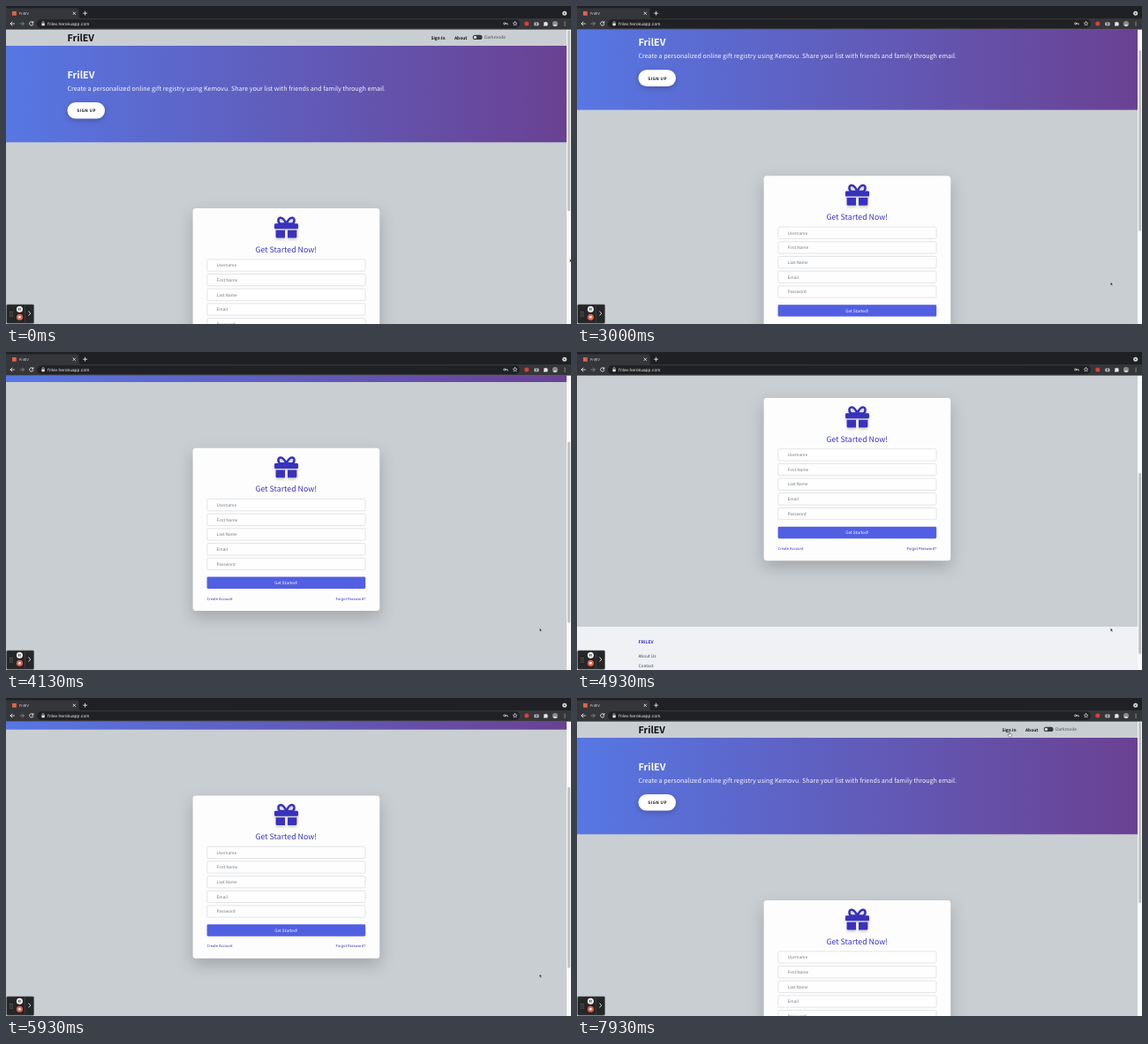
Animation, 640 px wide and 360 px high, one loop 8 s. Source, as an HTML page:

```html
<!DOCTYPE html>
<html lang="en">
<head>
<meta charset="utf-8">
<title>FrilEV</title>
<style>
  html, body { margin: 0; width: 100%; height: 100%; overflow: hidden; background: #c9ced2; }
  svg { display: block; width: 100%; height: 100%; }
  text {
    font-family: "Noto Sans CJK JP", "Noto Sans CJK SC", "Noto Sans CJK", "Noto Sans", sans-serif;
    text-rendering: geometricPrecision;
    white-space: pre;
  }
  .ui text { font-family: Inter, Roboto, sans-serif; }
  .line { fill: none; stroke: #e4e5e7; stroke-width: .9; stroke-linecap: round; stroke-linejoin: round; }
  .card { filter: drop-shadow(0 7px 9px rgba(0, 0, 0, .2)); }
  .pill { filter: drop-shadow(0 2px 3px rgba(0, 0, 0, .22)); }
  .gift { filter: drop-shadow(0 2px 1.5px rgba(0, 0, 0, .2)); }
</style>
</head>
<body>
<svg viewBox="0 0 640 360" xmlns="http://www.w3.org/2000/svg">
  <defs>
    <linearGradient id="hero">
      <stop offset="0" stop-color="#5777e3"/>
      <stop offset="1" stop-color="#6a4192"/>
    </linearGradient>
    <clipPath id="view"><rect y="26.5" width="635" height="333.5"/></clipPath>
  </defs>

  <rect width="640" height="360" fill="#c9ced2"/>
  <g clip-path="url(#view)">
    <g id="page">
      <rect y="45" width="635" height="109.3" fill="url(#hero)"/>
      <rect class="pill" x="69.5" y="109" width="42.5" height="18.6" rx="9.3" fill="#fff"/>
      <rect x="528.7" y="32.8" width="10.8" height="5.2" rx="2.6" fill="#343a40"/>
      <circle cx="531.4" cy="35.4" r="1.7" fill="#d5d9dc"/>

      <rect class="card" x="211.6" y="229" width="211.6" height="184.3" rx="3.5" fill="#fdfdfd"/>
      <g class="gift" fill="#3832bd">
        <rect x="304" y="246.2" width="27" height="6" rx="1.3"/>
        <path d="M305.6 253.7H316V262.5H307.1Q305.6 262.5 305.6 261ZM319 253.7H329.4V261Q329.4 262.5 327.9 262.5H319Z"/>
        <path fill="none" stroke="#3832bd" stroke-width="2.5" d="M317.5 246.6C315.4 241.6 312.6 239.4 310.6 239.7C307.6 240.2 307.8 245.4 311 246.6ZM317.5 246.6C319.6 241.6 322.4 239.4 324.4 239.7C327.4 240.2 327.2 245.4 324 246.6Z"/>
      </g>
      <g id="fields"></g>
      <rect x="227.6" y="374.8" width="179.6" height="13.4" rx="1.4" fill="#525fe3"/>

      <rect y="488" width="635" height="80" fill="#eff1f4"/>
      <g id="copy"></g>
    </g>
  </g>

  <rect x="635" y="26.5" width="5" height="333.5" fill="#f8f8f8"/>
  <rect id="thumb" x="636.2" y="27.2" width="2.9" height="205" rx="1.45" fill="#c0c1c2"/>

  <g class="ui" id="browser">
    <rect width="640" height="14" fill="#1f2023"/>
    <path d="M0 14V2.5H80Q82.5 2.5 82.5 5V12Q82.5 14 85 14Z" fill="#35363a"/>
    <rect y="14" width="640" height="12.6" fill="#35363a"/>
    <rect x="35" y="15.2" width="547" height="9.8" rx="4.9" fill="#202124"/>
    <rect x="7" y="6" width="4.8" height="4.8" fill="#e0624d"/>
    <path class="line" stroke-width=".7" d="M76 7L78.6 9.6M78.6 7L76 9.6M87.6 8.2H91.6M89.6 6.2V10.2"/>
    <path class="line" d="M9.4 20H5M7 18L5 20L7 22"/>
    <path class="line" style="stroke:#85878b" d="M16 20H20.4M18.4 18L20.4 20L18.4 22"/>
    <path class="line" d="M30.4 18.4A2.2 2.2 0 1 0 30.9 20.6M30.9 17.6V19.1H29.4"/>
    <rect x="40.4" y="19.4" width="3.4" height="2.8" rx=".4" fill="#e4e5e7"/>
    <path class="line" style="stroke-width:.6" d="M41.1 19.4V18.5A1 1 0 0 1 43.1 18.5V19.4"/>
    <circle class="line" style="stroke-width:.7" cx="564.7" cy="19.9" r="1.1"/>
    <path class="line" style="stroke-width:.8" d="M565.9 19.9H568.2V21"/>
    <path class="line" style="stroke-width:.6" d="M576.6 17.5L577.3 19.1L579 19.2L577.7 20.3L578.1 22L576.6 21.1L575.1 22L575.5 20.3L574.2 19.2L575.9 19.1Z"/>
    <circle cx="589.8" cy="20" r="2.5" fill="#d8403c"/>
    <rect x="598.3" y="18.4" width="5.2" height="3.8" rx=".7" fill="#b9bbbf"/>
    <circle cx="600.9" cy="20.3" r="1.1" fill="#55575b"/>
    <path d="M609 18.4H610.6A1 1 0 0 1 612.4 18.4H613.4V19.6A1 1 0 0 1 613.4 21.2V22.6H609V21.2A.9.9 0 0 0 609 19.6Z" fill="#e4e5e7"/>
    <circle cx="622" cy="20" r="3.1" fill="#8d8a8b"/>
    <path d="M619.6 22A2.6 2.6 0 0 1 624.4 22A3.1 3.1 0 0 1 619.6 22Z" fill="#d2cecd"/>
    <path d="M632.6 17.7h.9v.9h-.9zM632.6 19.6h.9v.9h-.9zM632.6 21.5h.9v.9h-.9z" fill="#e4e5e7"/>
    <circle cx="632.7" cy="8.3" r="2.5" fill="#d8d9db"/>
    <path d="M631.5 7.8H633.9L632.7 9.3Z" fill="#1f2023"/>
  </g>

  <g id="recorder">
    <rect x=".7" y="338" width="30.8" height="21.2" rx="1.2" fill="#252627" stroke="#55585a" stroke-width=".6"/>
    <path d="M21.6 338.3V359" stroke="#48494b" stroke-width=".6"/>
    <path d="M4.8 346V352M7 346V352" stroke="#a5a6a8" stroke-width=".9" stroke-dasharray=".9 1.4"/>
    <circle cx="15.4" cy="343.2" r="3.5" fill="#f4f4f4"/>
    <path d="M14.6 341.8V344.6M16.2 341.8V344.6" stroke="#252627" stroke-width=".8"/>
    <circle cx="15.4" cy="352.2" r="3.5" fill="#e8624f"/>
    <rect x="14.2" y="351" width="2.4" height="2.4" fill="#fff"/>
    <path class="line" d="M25.8 345.8L27.8 348L25.8 350.2"/>
  </g>

  <g id="pointer" stroke="#fff" stroke-width=".35" fill="#111">
    <path id="arrow" d="M0 0V3.9L.95 3.1L1.6 4.5L2.25 4.2L1.65 2.9H2.8Z"/>
    <path id="hand" fill="#fff" stroke="#111" stroke-width=".4" d="M-.4 .3Q0 -.2 .4 .3V2L2.4 2.4Q2.8 2.6 2.7 3.2L2.2 5.4H-.3L-1.7 3.5Q-1.5 2.7 -.9 3.1L-.4 3.5Z"/>
  </g>
</svg>

<script>
const LOOP = 8000;
const $ = id => document.getElementById(id);

function add(parent, tag, attrs, content = "") {
  const node = document.createElementNS("http://www.w3.org/2000/svg", tag);
  for (const key in attrs) node.setAttribute(key, attrs[key]);
  node.textContent = content;
  return parent.appendChild(node);
}

function write(parent, content, x, y, size, fill, weight = 400, anchor = "start", spacing = 0) {
  add(parent, "text", {
    x, y, fill, "font-size": size, "font-weight": weight,
    "text-anchor": anchor, "letter-spacing": spacing
  }, content);
}

const copy = $("copy"), fields = $("fields"), browser = $("browser");
const indigo = "#3c36cd", link = "#352fbd";

write(browser, "FrilEV", 15, 9.8, 4, "#dfe0e2");
write(browser, "frilev.herokuapp.com", 47, 21.8, 4.75, "#eeeff0");

write(copy, "FrilEV", 69.5, 39.6, 10.7, "#0b0c0d", 900);
write(copy, "Sign In", 481.4, 38, 4.8, "#111", 700);
write(copy, "About", 508, 38, 4.8, "#111", 700);
write(copy, "Darkmode", 542, 37.4, 4.9, "#4c5055");
write(copy, "FrilEV", 69.5, 82, 10.9, "#fff", 700);
write(copy, "Create a personalized online gift registry using Kemovu. Share your list with friends and family through email.",
  69.5, 95.6, 7.13, "#f6f5fb");
write(copy, "SIGN UP", 80.2, 120.3, 4.7, "#151515", 700, "start", .4);
write(copy, "Get Started Now!", 317.3, 278.7, 8.82, indigo, 400, "middle");
write(copy, "Get Started!", 317.3, 383.2, 4.7, "#fff", 400, "middle");
write(copy, "Create Account", 227.6, 401, 4.12, link, 500);
write(copy, "Forgot Password?", 407.2, 401, 4.1, link, 500, "end");
write(copy, "FRILEV", 69.5, 507.4, 5, indigo, 700);
write(copy, "About Us", 69.5, 523.5, 4.73, "#3f4347");
write(copy, "Contact", 69.5, 534.1, 4.75, "#3f4347");

["Username", "First Name", "Last Name", "Email", "Password"].forEach((label, i) => {
  const y = 286.8 + i * 16.67;
  add(fields, "rect", { x: 227.8, y, width: 179.2, height: 13.3, rx: 1.4, fill: "#fefefe", stroke: "#d0d3d8", "stroke-width": .6 });
  write(fields, label, 238.6, y + 8.4, 4.71, "#74797f");
});

// Steps: [time, ...values], linear in between
const scrollSteps = [[2500, 0], [2680, 9], [3000, 36.6], [4130, 120.2], [4930, 177], [5100, 188], [5260, 190],
  [5450, 180], [5930, 118.7], [6400, 46], [6620, 12], [6790, 0]];
const pointerSteps = [[150, 638.7, 286.2], [350, 631, 293], [600, 611, 308], [850, 604.4, 312.4],
  [6870, 604.4, 312.4], [7050, 594, 280], [7350, 540, 135], [7580, 500, 56], [7760, 489.6, 38.6]];

function at(steps, time) {
  const next = steps.findIndex(step => step[0] > time);
  if (next === 0) return steps[0].slice(1);
  if (next < 0) return steps[steps.length - 1].slice(1);
  const a = steps[next - 1], b = steps[next];
  const part = (time - a[0]) / (b[0] - a[0]);
  return a.slice(1).map((v, i) => v + (b[i + 1] - v) * part);
}

function draw(time) {
  const [scroll] = at(scrollSteps, time);
  const [x, y] = at(pointerSteps, time);
  const overLink = time >= 7680;
  $("page").setAttribute("transform", `translate(0 ${-scroll})`);
  $("thumb").setAttribute("transform", `translate(0 ${scroll * .62})`);
  $("pointer").setAttribute("transform", `translate(${x} ${y})`);
  $("arrow").style.display = overLink ? "none" : "";
  $("hand").style.display = overLink ? "" : "none";
}

const start = performance.now();
function tick() {
  draw((performance.now() - start) % LOOP);
  requestAnimationFrame(tick);
}
tick();
</script>
</body>
</html>
```
